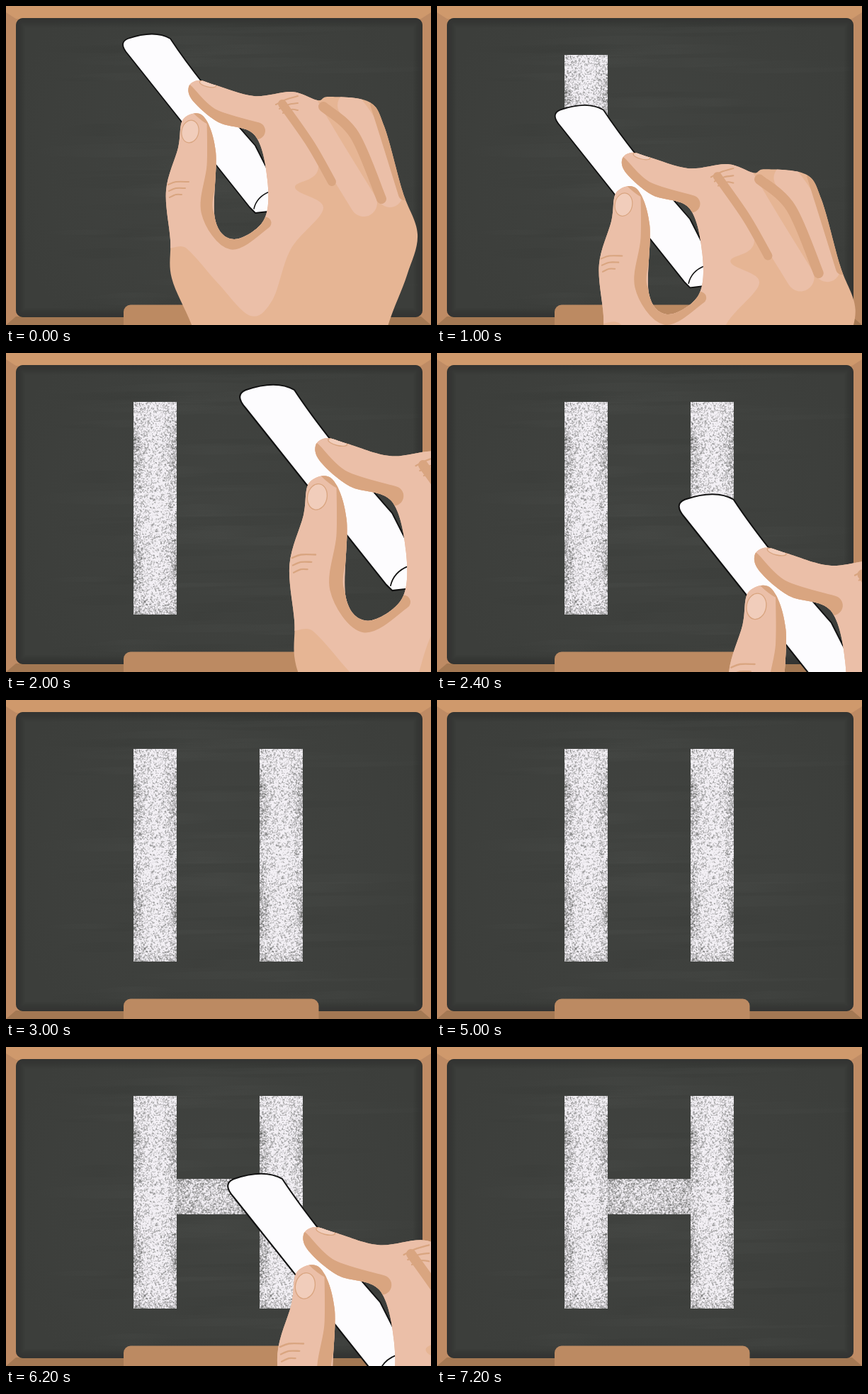
An HTML page with a canvas for the animation above (7600 ms loop, 600 px wide and 450 px high).

```html
<!DOCTYPE html>
<html lang="en">
<head>
<meta charset="utf-8">
<title>Chalk letter H</title>
<style>
html, body { margin: 0; width: 100%; height: 100%; overflow: hidden; background: #3b3d3a; }
canvas { display: block; }
</style>
</head>
<body>
<canvas id="stage" width="600" height="450"></canvas>
<script>
const W = 600, H = 450, LOOP = 7600, STEP = 200;
const ctx = document.getElementById('stage').getContext('2d');
const clamp = (v, lo = 0, hi = 1) => Math.max(lo, Math.min(hi, v));
const mix = (a, b, k) => a + (b - a) * k;

function layer(w, h) {
  const c = document.createElement('canvas');
  c.width = w;
  c.height = h;
  return c;
}

function seeded(seed) {
  return () => {
    seed = (seed + 0x6D2B79F5) | 0;
    let t = Math.imul(seed ^ (seed >>> 15), 1 | seed);
    t = (t + Math.imul(t ^ (t >>> 7), 61 | t)) ^ t;
    return ((t ^ (t >>> 14)) >>> 0) / 4294967296;
  };
}

// Smooth curve through all points
function curve(p, closed = true) {
  const path = new Path2D(), n = p.length / 2;
  const at = i => {
    const k = closed ? (i + n) % n : clamp(i, 0, n - 1);
    return [p[2 * k], p[2 * k + 1]];
  };
  path.moveTo(p[0], p[1]);
  for (let i = 0; i < (closed ? n : n - 1); i++) {
    const [a, b, c, d] = [at(i - 1), at(i), at(i + 1), at(i + 2)];
    path.bezierCurveTo(
      b[0] + (c[0] - a[0]) / 6, b[1] + (c[1] - a[1]) / 6,
      c[0] - (d[0] - b[0]) / 6, c[1] - (d[1] - b[1]) / 6, c[0], c[1]);
  }
  if (closed) path.closePath();
  return path;
}

function makeBoard() {
  const c = layer(W, H), g = c.getContext('2d'), rnd = seeded(11);
  const poly = (color, ...p) => {
    g.fillStyle = color;
    g.beginPath();
    for (let i = 0; i < p.length; i += 2) g.lineTo(p[i], p[i + 1]);
    g.fill();
  };
  g.fillStyle = '#be8b64';
  g.fillRect(0, 0, W, H);
  poly('#cf996c', 0, 0, W, 0, W, 9, 586, 18, 14, 18, 0, 9);
  poly('#a37853', 0, H, 14, 438, 586, 438, W, H);

  g.save();
  g.beginPath();
  g.roundRect(14, 17, 574, 422, 10);
  g.fillStyle = '#3c3e3b';
  g.fill();
  g.clip();
  const glow = g.createRadialGradient(300, 220, 40, 300, 220, 310);
  glow.addColorStop(0, 'rgba(80,83,80,.22)');
  glow.addColorStop(1, 'rgba(80,83,80,0)');
  g.fillStyle = glow;
  g.fillRect(0, 0, W, H);
  for (let i = 0; i < 60; i++) {
    const x = 20 + rnd() * 380, y = 30 + rnd() * 390;
    const w = 90 + rnd() * 260, h = 2 + rnd() * 8;
    const s = g.createLinearGradient(x, 0, x + w, 0);
    const tone = rnd() < .5 ? '95,98,95' : '40,43,40';
    s.addColorStop(0, `rgba(${tone},0)`);
    s.addColorStop(.5, `rgba(${tone},.08)`);
    s.addColorStop(1, `rgba(${tone},0)`);
    g.fillStyle = s;
    g.beginPath();
    g.ellipse(x + w / 2, y, w / 2, h, -.015, 0, 7);
    g.fill();
  }
  // Soft dark rim
  g.strokeStyle = 'rgba(40,42,38,.1)';
  for (let w = 2; w < 28; w += 4) {
    g.lineWidth = w;
    g.beginPath();
    g.roundRect(14, 17, 574, 422, 10);
    g.stroke();
  }
  g.restore();

  g.fillStyle = '#bc8a62';
  g.beginPath();
  g.roundRect(166, 421.5, 275.5, 50, 10);
  g.fill();
  return c;
}

// Grainy chalk patch; cover(u, v) sets how solid it is
function makeGrain(w, h, seed, cover) {
  const c = layer(w, h), g = c.getContext('2d'), rnd = seeded(seed);
  const img = g.createImageData(w, h), row = w + 1;
  const r = Array.from({ length: row * (h + 1) }, rnd);
  for (let y = 0; y < h; y++) for (let x = 0; x < w; x++) {
    const k = y * row + x;
    const n = (r[k] + r[k + 1] + r[k + row] + r[k + row + 1]) / 4;
    const a = clamp(cover(x / w * 2 - 1, y / h) + (n - .5) * 1.25, .2, 1);
    img.data.set([243, 240, 245, 255 * a], 4 * (y * w + x));
  }
  g.putImageData(img, 0, 0);
  return c;
}

const board = makeBoard();
const bar = makeGrain(61, 300, 5, (u, v) => {
  const worn = .5 - .5 * Math.cos(v * 4 * Math.PI);
  const foot = clamp((v - .9) * 10);
  return .97 - u * u * (.14 + .24 * worn) - .18 * foot;
});
const cross = makeGrain(117, 50, 8, (u, v) => .84 - .1 * u * u - .2 * Math.abs(v - .5));

const SKIN = '#e6b594', PINK = '#ebbfa8', SHADE = '#d9a580', NAIL = '#f1cdbb';

const chalk = new Path2D('M172 68Q158 52 172 46Q210 33 232 46Q270 104 352 197L385 262L370 290L352 292L344 284Z');
const chalkEnd = new Path2D('M350 286Q354 269 372 262');

const hand = curve([
  258, 114, 272, 105, 297, 112, 350, 127, 404, 121, 440, 133, 456, 128, 512, 135,
  534, 170, 560, 262, 581, 322, 566, 380, 538, 455, 520, 540, 290, 540, 264, 455,
  234, 384, 232, 330, 226, 260, 243, 200, 250, 160, 278, 155, 296, 205, 295, 300,
  322, 329, 364, 302, 369, 245, 351, 182, 300, 164, 264, 134]);

const palm = curve([
  230, 100, 400, 112, 441, 225, 408, 256, 448, 285, 402, 343, 376, 415, 345, 437,
  300, 392, 255, 342, 215, 320]);

// Fingers and shadows as thick strokes: colour, width, points
const strokes = [
  [PINK, 38, [420, 138, 460, 205, 505, 278]],
  [PINK, 36, [486, 140, 515, 185, 542, 266]],
  [SHADE, 24, [254, 122, 290, 156, 354, 176]],
  [SHADE, 17, [292, 160, 292, 225, 284, 290, 318, 335, 366, 306]],
  [SHADE, 12, [390, 138, 430, 195, 460, 248]],
  [SHADE, 14, [448, 142, 492, 182, 530, 272]],
  [SHADE, 16, [522, 138, 540, 195, 562, 266]]
].map(([color, width, p]) => [color, width, curve(p, false)]);

const creases = [0, 1, 2].flatMap(i => [
  curve([229 + i, 252 + 9 * i, 240, 248 + 9 * i, 258 - 5 * i, 248 + 9 * i], false),
  curve([381 + 5 * i, 139 + 6 * i, 395 + 4 * i, 132 + 7 * i, 412, 127 + 10 * i], false)
]);

function line(path, width, color) {
  ctx.lineWidth = width;
  ctx.strokeStyle = color;
  ctx.stroke(path);
}

function fill(path, color) {
  ctx.fillStyle = color;
  ctx.fill(path);
}

function nail(x, y, rx, ry, turn) {
  const path = new Path2D();
  path.ellipse(x, y, rx, ry, turn, 0, 2 * Math.PI);
  fill(path, NAIL);
  line(path, 1.2, SHADE);
}

function drawHand({ x, y, size }) {
  ctx.save();
  ctx.translate(x, y);
  ctx.scale(size, size);
  ctx.translate(-164, -38);
  ctx.lineCap = ctx.lineJoin = 'round';
  fill(chalk, '#fdfcfe');
  line(chalk, 1.8, '#111');
  line(chalkEnd, 1.5, '#111');
  fill(hand, SKIN);
  ctx.clip(hand);
  fill(palm, PINK);
  for (const [color, width, path] of strokes) line(path, width, color);
  for (const path of creases) line(path, 2, SHADE);
  nail(260, 177, 12, 16, .2);
  nail(285, 110, 12, 4, .25);
  ctx.restore();
}

const pose = (x, y, size) => ({ x, y, size });
const topLeft = pose(164, 38, 1), footLeft = pose(169, 351, 1.06);
const topRight = pose(329, 43, 1.15), footRight = pose(352, 352, 1.15);
const barLeft = pose(168, 177, 1.15), barRight = pose(312, 177, 1.15);

// start, end, pose before, pose after, easing power
const moves = [
  [400, 1600, topLeft, footLeft, 1.64],
  [1600, 2000, footLeft, topRight, 1],
  [2000, 2800, topRight, footRight, 1],
  [5400, 5600, pose(240, 240, 1.15), barLeft, 1],
  [5600, 6200, barLeft, barRight, 1.52]
];

function poseAt(t) {
  if ((t >= 3000 && t < 5400) || t >= 6400) return null;
  const [from, to, a, b, power] = moves.findLast(m => t >= m[0]) || moves[0];
  const k = clamp((t - from) / (to - from)) ** power;
  return pose(mix(a.x, b.x, k), mix(a.y, b.y, k), mix(a.size, b.size, k));
}

function reveal(img, x, y, w, h) {
  w = Math.round(Math.min(w, img.width));
  h = Math.round(Math.min(h, img.height));
  if (w > 0 && h > 0) ctx.drawImage(img, 0, 0, w, h, x, y, w, h);
}

function draw(now) {
  const t = Math.floor((now % LOOP) / STEP) * STEP;
  const tip = poseAt(t);
  const down = tip ? tip.y + 20 - 69 : 300;
  ctx.drawImage(board, 0, 0);
  reveal(bar, 180, 69, 61, t < 1800 ? down : 300);
  if (t >= 2000) reveal(bar, 358, 69, 61, t < 3000 ? down : 300);
  if (t >= 5600) reveal(cross, 241, 186, tip ? tip.x + 60 - 241 : 117, 50);
  if (tip) drawHand(tip);
}

let start;
function tick(now) {
  start ??= now;
  draw(now - start);
  requestAnimationFrame(tick);
}
draw(0);
requestAnimationFrame(tick);
</script>
</body>
</html>
```
